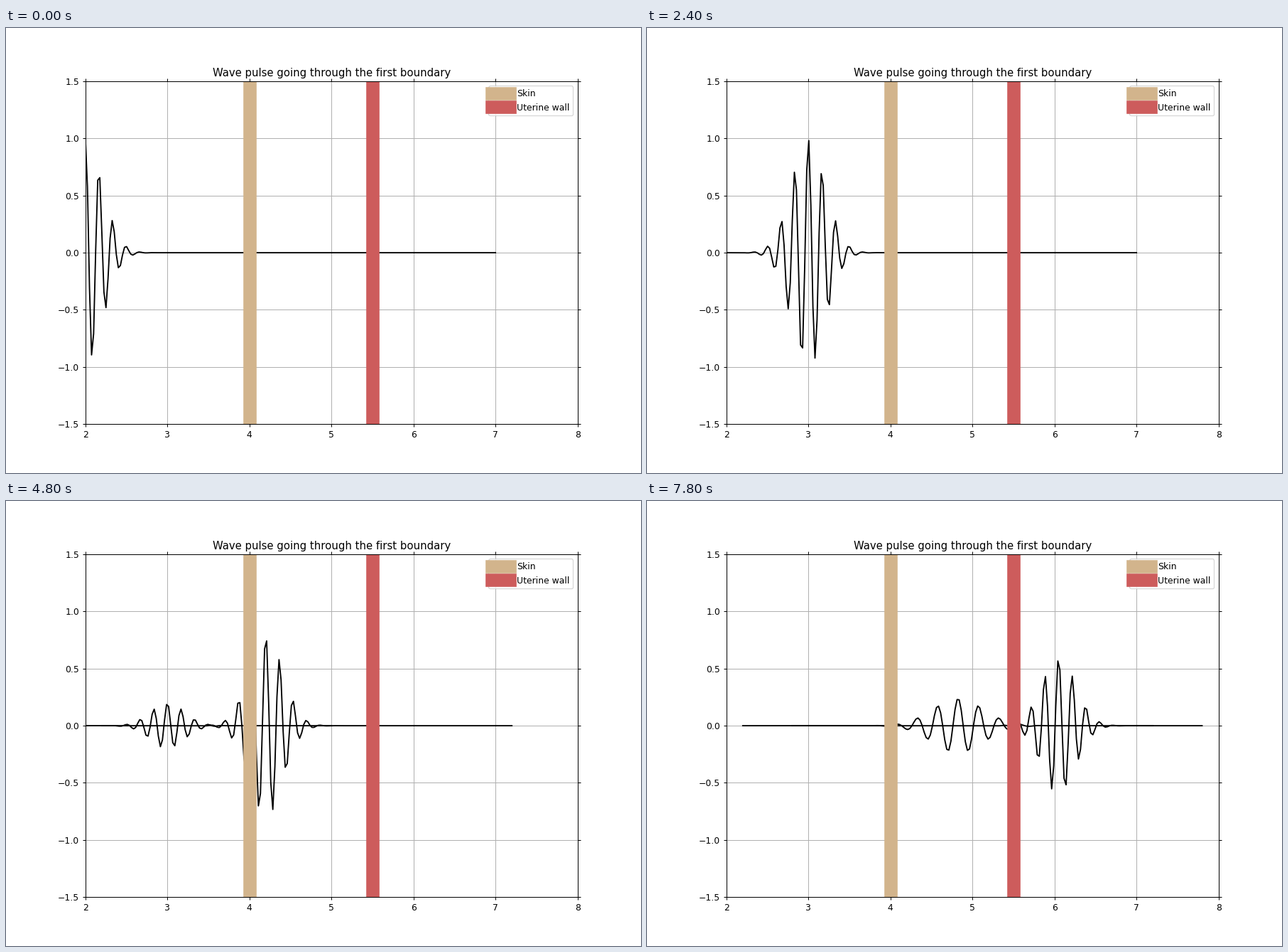
A matplotlib script for the animation above (8000 ms loop, 894 px wide and 626 px high).

```python
import numpy as np
import matplotlib.pyplot as plt
from matplotlib.animation import FuncAnimation

FRAMES, INTERVAL = 40, 200
SPEED = 1 / 12             # distance per frame
SKIN, WALL = 4.0, 5.5
AT_SKIN, AT_WALL = 23, 38  # frames at which the pulse meets each boundary

X = np.linspace(2, 7, 200)


def pulse(d, freq=6, bw=0.3):
    """Gaussian-modulated cosine; bw is the relative bandwidth at -6 dB."""
    a = (np.pi * freq * bw) ** 2 / (4 * np.log(10 ** 0.3))
    return np.exp(-a * d ** 2) * np.cos(2 * np.pi * freq * d)


def wave(start, center, amp, freq=6):
    x = X - 2 + start
    return x, amp * pulse(x - center, freq)


def waves(i):
    """Curves for the forward and the reflected pulse."""
    t = i * SPEED
    if i < AT_SKIN:
        return wave(2, 2 + t, 1), ([], [])
    if i < AT_WALL:
        return wave(2.2, 2.2 + t, 0.8), wave(0, 5 - t, 0.2)
    return wave(2.8, 2.8 + t, 0.6), wave(2.2, 8.075 - t, 0.24, freq=4)


fig, ax = plt.subplots(figsize=(10, 7.0025), dpi=89.4)
forward, = ax.plot([], [], color="black", lw=1.5)
reflected, = ax.plot([], [], color="black", lw=1.5)
ax.axvline(SKIN, color="tan", lw=15, label="Skin")
ax.axvline(WALL, color="indianred", lw=15, label="Uterine wall")

ax.set_xlim(2, 8)
ax.set_ylim(-1.5, 1.5)
ax.set_title("Wave pulse going through the first boundary")
ax.tick_params(top=True, right=True)
ax.grid(True)
ax.legend(loc="upper right")


def update(i):
    ahead, back = waves(i)
    forward.set_data(*ahead)
    reflected.set_data(*back)
    return forward, reflected


anim = FuncAnimation(fig, update, frames=FRAMES, interval=INTERVAL,
                     init_func=lambda: update(0), repeat=True, repeat_delay=0)
plt.show()
```
